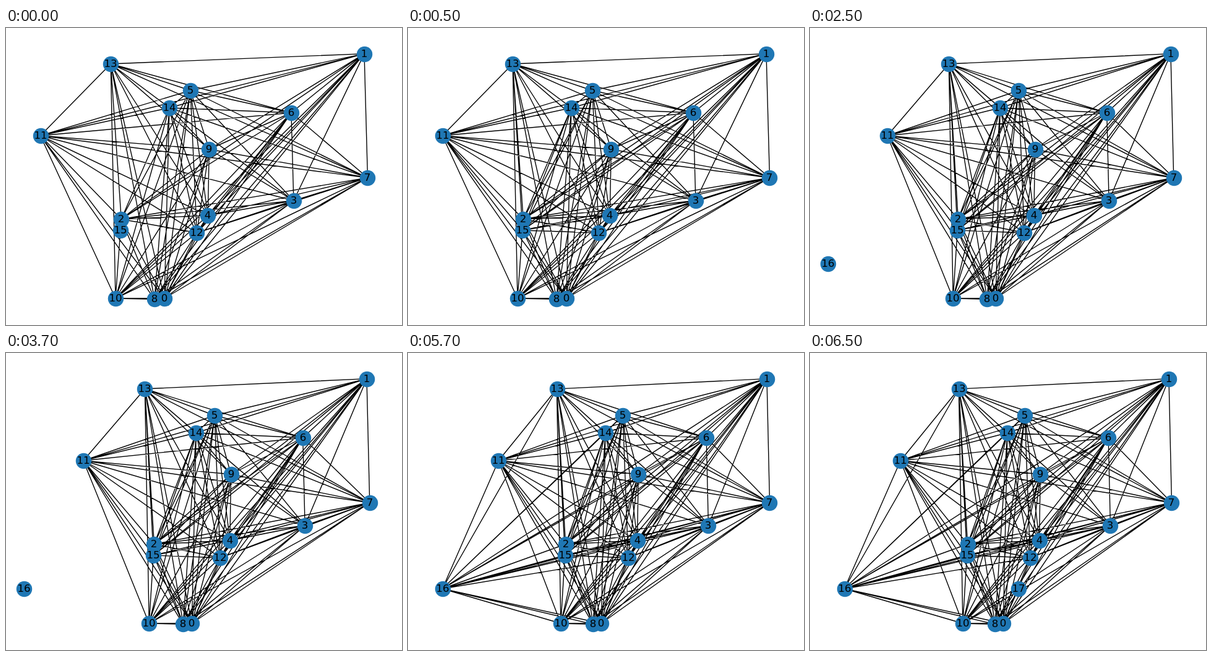
Animation, 640 px wide and 480 px high, one loop 8 s. Source, as an HTML page:

```html
<!DOCTYPE html>
<html lang="en">
<head>
<meta charset="utf-8">
<title>Growing complete graph</title>
<style>
  html, body { margin: 0; width: 100%; height: 100%; overflow: hidden; background: #fff; }
  svg { display: block; width: 100%; height: 100%; }
  path { stroke: #000; stroke-width: 1.389; fill: none; }
  circle { fill: #1f77b4; }
  text { font: 16.667px "DejaVu Sans", sans-serif; text-anchor: middle; fill: #000; }
</style>
</head>
<body>
<svg id="stage" viewBox="0 0 640 480">
  <path id="edges"/>
  <g id="dots"></g>
  <g id="labels"></g>
</svg>
<script>
const LOOP = 8000;
const RADIUS = 12.72;

// Node places in the first layout; later layouts rescale x only.
const LEFT = 55.54, WIDTH = 528.93;
const nodes = [
  [256, 437], [579, 41.65], [186.3, 309], [464.9, 279], [326.3, 303], [298, 101],
  [461, 137], [584.46, 242], [240, 438.35], [328.3, 196], [177, 437], [55.54, 174],
  [308.49, 331], [169.25, 58], [264, 129], [185.1, 327],
];

// Nodes that join later, placed in the last layout.
const late = [[55.54, 381], [337, 381]];
const LATE_LEFT = 146.3, LATE_WIDTH = 438.2;
for (const [x, y] of late) {
  nodes.push([LEFT + (x - LATE_LEFT) / LATE_WIDTH * WIDTH, y]);
}

// Each new node appears alone, then is linked to all the others.
const stages = [
  { start: 0, shown: 16, linked: 15, left: LEFT, width: WIDTH },
  { start: 500, shown: 16, linked: 16, left: LEFT, width: WIDTH },
  { start: 2500, shown: 17, linked: 16, left: 124.96, width: 462.8 },
  { start: 4500, shown: 17, linked: 17, left: LATE_LEFT, width: LATE_WIDTH },
  { start: 6500, shown: 18, linked: 17, left: LATE_LEFT, width: LATE_WIDTH },
];

const byId = id => document.getElementById(id);

function add(parent, tag, attrs) {
  const el = document.createElementNS("http://www.w3.org/2000/svg", tag);
  setAll(el, attrs);
  return parent.appendChild(el);
}

function setAll(el, attrs) {
  for (const key in attrs) el.setAttribute(key, attrs[key]);
}

const dots = nodes.map(() => add(byId("dots"), "circle", { r: RADIUS }));
const labels = nodes.map((_, i) => {
  const label = add(byId("labels"), "text", {});
  label.textContent = i;
  return label;
});

function draw(stage) {
  const points = nodes.map(([x, y]) => [stage.left + (x - LEFT) / WIDTH * stage.width, y]);

  let d = "";
  for (let i = 0; i < stage.linked; i++) {
    for (let j = i + 1; j < stage.linked; j++) d += `M${points[i]}L${points[j]}`;
  }
  byId("edges").setAttribute("d", d);

  // Dots sit on pixel centres.
  points.forEach(([x, y], i) => {
    const display = i < stage.shown ? "inline" : "none";
    const px = Math.round(x), py = Math.round(y);
    setAll(dots[i], { cx: px + 0.5, cy: py + 0.5, display });
    setAll(labels[i], { x: px, y: py + 5, display });
  });
}

let current;
function update(now) {
  const t = now % LOOP;
  const stage = stages.findLast(s => t >= s.start);
  if (stage !== current) draw(current = stage);
}

const origin = performance.now();
function tick() {
  update(performance.now() - origin);
  requestAnimationFrame(tick);
}
tick();
</script>
</body>
</html>
```
